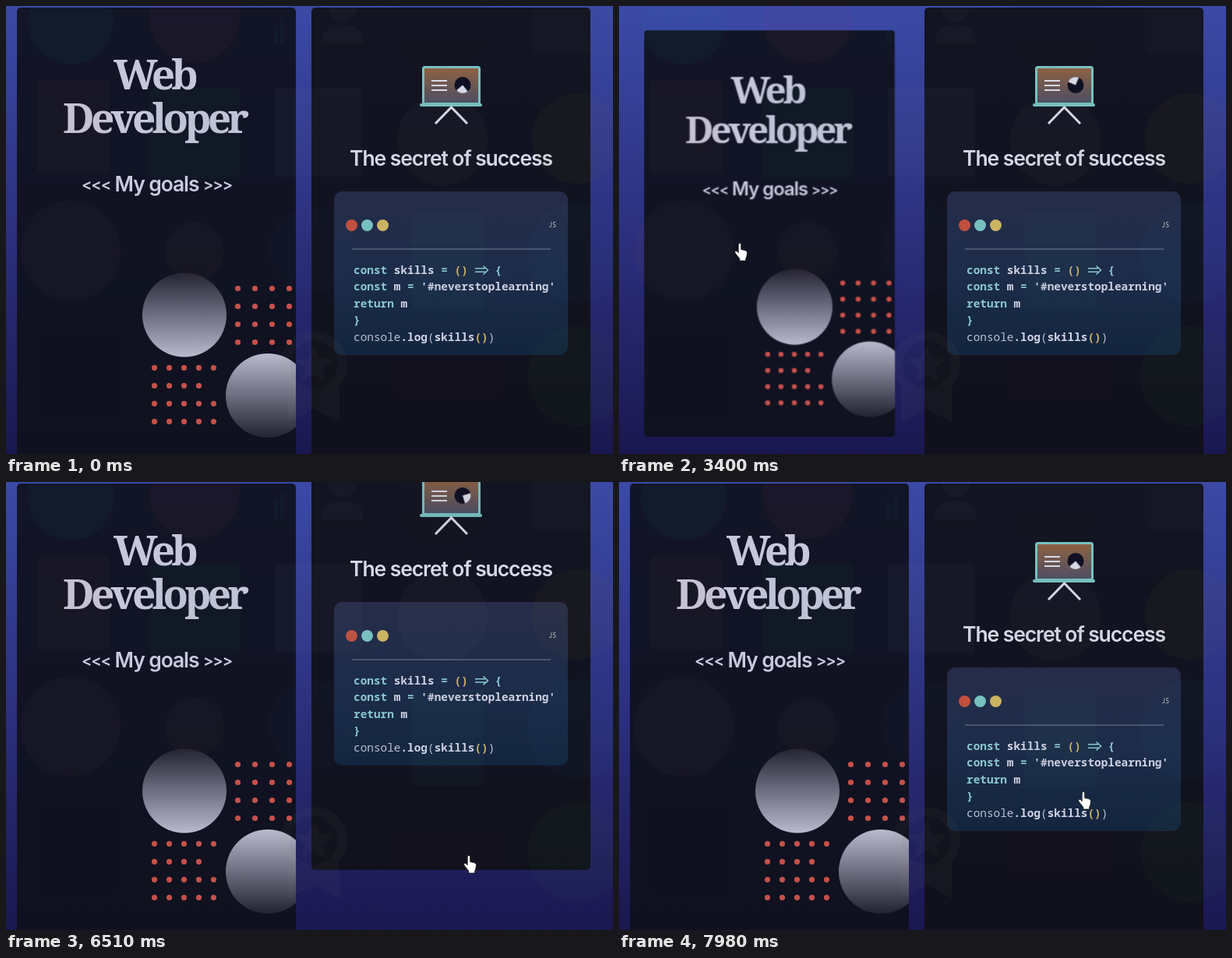
Write an HTML page that moves like this. It is 779 px wide and 575 px high and loops after 8000 ms.

```html
<!DOCTYPE html>
<html lang="en">
<head>
<meta charset="utf-8">
<title>Web Developer</title>
<style>
html, body { margin: 0; width: 100%; height: 100%; overflow: hidden; background: #1a1850; }
svg { display: block; width: 779px; height: 575px; }
text { white-space: pre; }
.title { font: bold 53px "Noto Serif", serif; letter-spacing: -4.7px; fill: #c6c7dc; }
.heading { font: 600 26.5px Inter, sans-serif; letter-spacing: -1.1px; text-anchor: middle; }
.arrows { font-size: 20px; }
.code { font: 600 14.4px "Noto Sans Mono", monospace; fill: #d0d2e4; }
.key { fill: #8ac8cf; }
.paren { fill: #d6b367; }
.plain { font-weight: 400; fill: #bcbfd2; }
.dots { fill: none; stroke: #c55148; stroke-width: 7.2; stroke-linecap: round; }
.backdrop { opacity: .045; }

.left, .right, .pie, .cursor { animation: 8s linear infinite; }
.left { animation-name: press; transform-origin: 193px 292px; }
.right { animation-name: hop; }
.pie { animation-name: turn; transform-origin: 586px 101.5px; }
.cursor { animation-name: wander; }
.left, .right { animation-timing-function: cubic-bezier(.37, 0, .63, 1); }

@keyframes press {
  0%, 36%, 48%, 100% { transform: scale(1); }
  40.5%, 43.5% { transform: scale(.9); }
}
@keyframes hop {
  0%, 77.7%, 87.7%, 97.7%, 100% { transform: translateY(0); }
  82.7%, 92.7% { transform: translateY(-100px); }
}
@keyframes turn {
  from { transform: rotate(185deg); }
  to { transform: rotate(545deg); }
}
@keyframes wander {
  0% { transform: translate(602px, 580px); }
  1.4% { transform: translate(598px, 565px); }
  5.6% { transform: translate(520px, 556px); }
  10.25% { transform: translate(408px, 556px); }
  15% { transform: translate(260px, 540px); }
  18.75% { transform: translate(160px, 460px); }
  21% { transform: translate(116px, 390px); }
  22% { transform: translate(107px, 364px); }
  23.75% { transform: translate(102px, 338px); }
  26.2% { transform: translate(120px, 314px); }
  27.9% { transform: translate(134px, 304px); }
  31.8% { transform: translate(138px, 304px); }
  35%, 48.5% { transform: translate(148px, 304px); }
  53% { transform: translate(390px, 318px); }
  54.1% { transform: translate(420px, 322px); }
  60% { transform: translate(560px, 342px); }
  64% { transform: translate(586px, 457px); }
  66%, 95% { transform: translate(587px, 479px); }
  99.7%, 100% { transform: translate(589px, 397px); }
}
</style>
</head>
<body>
<svg viewBox="0 0 779 575">
  <defs>
    <linearGradient id="sky" x2="0" y2="1">
      <stop stop-color="#3b4aa6"/><stop offset=".5" stop-color="#2c307f"/><stop offset="1" stop-color="#1a1850"/>
    </linearGradient>
    <linearGradient id="ball" x2="0" y2="1">
      <stop stop-color="#b9bace" stop-opacity=".1"/><stop offset="1" stop-color="#b9bace"/>
    </linearGradient>
    <linearGradient id="ballDown" href="#ball" y1="1" y2="0"/>
    <linearGradient id="card" x2="0" y2="1">
      <stop stop-color="#262c49"/><stop offset=".5" stop-color="#1c2c4a"/><stop offset="1" stop-color="#13253e"/>
    </linearGradient>
    <linearGradient id="screen" x2="0" y2="1">
      <stop stop-color="#8f6242"/><stop offset="1" stop-color="#4b4d63"/>
    </linearGradient>
    <clipPath id="leftEdge"><rect x="14" y="2" width="358" height="580" rx="5"/></clipPath>
  </defs>

  <rect width="779" height="575" fill="url(#sky)"/>

  <g class="left">
    <g clip-path="url(#leftEdge)">
      <rect x="14" y="2" width="358" height="580" fill="#10121c" fill-opacity=".93"/>
      <text class="title" x="138" y="107">Web</text>
      <text class="title" x="73" y="163">Developer</text>
      <text class="heading" x="193.5" y="238" fill="#c8cadf"><tspan class="arrows" dy="-2">&lt;&lt;&lt;</tspan><tspan dy="2"> My goals </tspan><tspan class="arrows" dy="-2">&gt;&gt;&gt;</tspan></text>
      <circle cx="229" cy="396.5" r="54" fill="url(#ball)"/>
      <circle cx="336" cy="500" r="54" fill="url(#ballDown)"/>
      <path class="dots" stroke-dasharray="0 22" d="M297.5 362.5h67M297.5 385.5h67M297.5 408.5h67M297.5 431.5h67"/>
      <path class="dots" stroke-dasharray="0 19" d="M190.5 464.3h77M190.5 487.3h58M190.5 510.3h77M190.5 533.3h77"/>
    </g>
  </g>

  <g class="right">
    <rect x="392" y="2" width="358" height="580" rx="5" fill="#10111a" fill-opacity=".94"/>
    <rect x="535.5" y="78.5" width="72" height="47" rx="2" fill="url(#screen)" stroke="#76c1bf" stroke-width="3"/>
    <rect x="531" y="125" width="80" height="4" rx="2" fill="#76c1bf"/>
    <path d="M551 151l20.5-21 20.5 21" fill="none" stroke="#d8dae8" stroke-width="3"/>
    <path d="M546 96h20M546 102h20M546 108h20" stroke="#d8dae8" stroke-width="2"/>
    <circle cx="586" cy="101.5" r="10.5" fill="#0f1023"/>
    <path class="pie" d="M586 101.5l-7.4-7.4a10.5 10.5 0 0 1 14.8 0z" fill="#d9dae6"/>
    <text class="heading" x="571" y="205" fill="#d6d8e8">The secret of success</text>

    <rect x="421" y="238" width="300" height="210" rx="10" fill="url(#card)"/>
    <circle cx="443.5" cy="281.5" r="7.5" fill="#c2503f"/>
    <circle cx="463.5" cy="281.5" r="7.5" fill="#78c0c0"/>
    <circle cx="483.5" cy="281.5" r="7.5" fill="#ccb362"/>
    <text x="696.5" y="284" font-family="Noto Sans Mono, monospace" font-size="8" fill="#cbd6c6">JS</text>
    <path d="M444 312h255" stroke="#4a5670" stroke-width="2"/>
    <g class="code">
      <text x="446" y="344"><tspan class="key">const</tspan> skills <tspan class="key">=</tspan> <tspan class="paren">()</tspan>    <tspan class="key">{</tspan></text>
      <path d="M602 336.8h13M602 341.2h13M612.5 333.5l6 5.5-6 5.5" fill="none" stroke="#8ac8cf" stroke-width="1.5"/>
      <text x="446" y="365"><tspan class="key">const</tspan> m <tspan class="key">=</tspan> '#neverstoplearning'</text>
      <text x="446" y="387"><tspan class="key">return</tspan> m</text>
      <text x="446" y="408" class="key">}</text>
      <text x="446" y="430"><tspan class="plain">console</tspan>.log<tspan class="plain">(</tspan>skills<tspan class="paren">()</tspan><tspan class="plain">)</tspan></text>
    </g>
  </g>

  <g class="backdrop">
    <circle cx="83" cy="20" r="55" fill="#18a8b8"/>
    <circle cx="242" cy="15" r="58" fill="#b84a78"/>
    <path d="M344 25h5v23h-5zM352 15h5v33h-5z" fill="#28a0d0"/>
    <g fill="#8088a0"><circle cx="432" cy="2" r="18"/><path d="M405 48q0-24 27-24t27 24z"/></g>
    <circle cx="560" cy="20" r="58" fill="#303038"/>
    <rect x="675" y="-10" width="86" height="72" rx="8" fill="#606878"/>
    <rect x="40" y="96" width="93" height="119" rx="5" fill="#b85840"/>
    <rect x="183" y="105" width="118" height="117" rx="8" fill="#208060"/>
    <rect x="345" y="105" width="111" height="114" fill="#8a8c98"/>
    <circle cx="560" cy="172" r="58" fill="#8a8890"/>
    <circle cx="733" cy="170" r="58" fill="#a08030"/>
    <circle cx="83" cy="314" r="64" fill="#a05a58"/>
    <circle cx="242" cy="315" r="38" fill="#a05840"/>
    <circle cx="393" cy="312" r="56" fill="#304870"/>
    <rect x="521" y="266" width="92" height="124" fill="#408880"/>
    <circle cx="733" cy="317" r="64" fill="#3078a8"/>
    <rect x="40" y="418" width="104" height="112" fill="#101018"/>
    <g fill="#a8a070">
      <path d="M362 490v45l33-18 33 18v-45z"/>
      <circle cx="395" cy="460" r="43"/>
      <circle cx="395" cy="460" r="31" fill="#383828"/>
      <path d="M395 436l7 16 17 2-13 11 4 17-15-9-15 9 4-17-13-11 17-2z"/>
    </g>
    <rect x="503" y="457" width="128" height="46" fill="#502030"/>
    <circle cx="733" cy="475" r="64" fill="#508038"/>
  </g>

  <path class="cursor" fill="#fff" stroke="#111" stroke-width=".8" d="M5.2 2.2q0-1.9 1.7-1.9t1.8 1.9v6.3l5.2 1.1q2.7.8 2.7 3.2l-.8 4.8q-.3 1.6-1.1 2.4v3H6.8v-2.6L1 13q-1-2 .8-2.7 1.4-.3 3.4 2.4z"/>
</svg>
</body>
</html>
```
